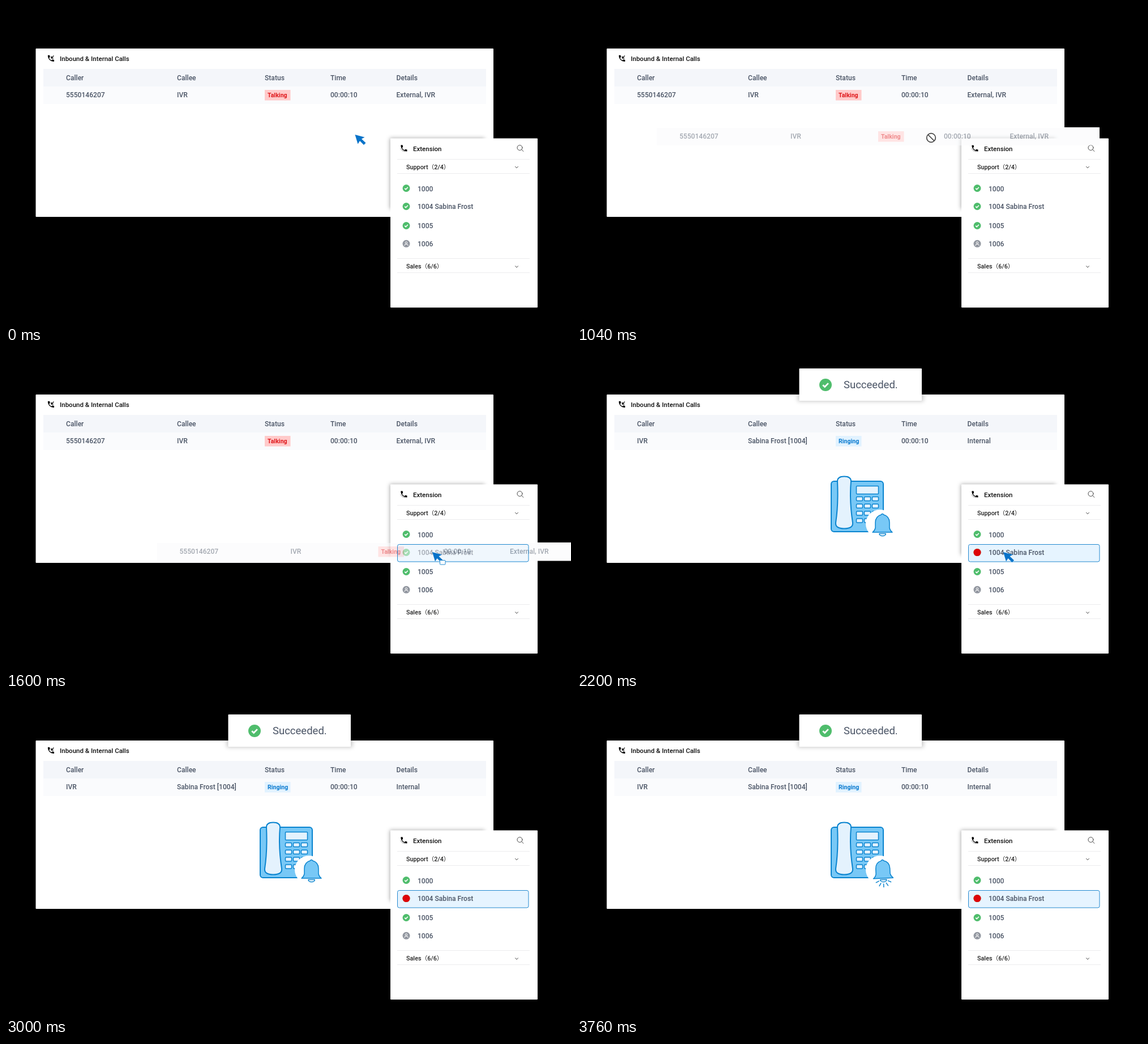
An HTML page that plays this animation: 998x561 px, repeating every 3800 ms.

```html
<!DOCTYPE html>
<html lang="en">
<head>
<meta charset="utf-8">
<title>Drag a call to an extension</title>
<style>
  html, body { margin: 0; width: 100%; height: 100%; overflow: hidden; background: #000; }
  svg { display: block; width: 100vw; height: 100vh; }
  text { font: 500 12.1px Roboto, "Noto Sans CJK SC", "Noto Sans CJK JP", sans-serif; fill: #4b5566; white-space: pre; }
  .title { font-size: 11.5px; fill: #111; }
  .group { font-size: 10.8px; fill: #222; }
  .chip { font-size: 10.6px; font-weight: 700; }
  .line { fill: none; stroke: #444; stroke-linecap: round; stroke-linejoin: round; }
  .rule { stroke: #ececee; }
  .art { stroke: #0a84cf; stroke-width: 2; stroke-linejoin: round; stroke-linecap: round; }
</style>
</head>
<body>
<svg viewBox="0 0 998 561">
  <defs>
    <filter id="soft" x="-20%" y="-20%" width="140%" height="140%"><feGaussianBlur stdDeviation="3.5"/></filter>
    <g id="check">
      <circle r="6.5" fill="#4fbd6c"/>
      <path d="M-2.8 .1L-.8 2.1L2.9-1.7" fill="none" stroke="#fff" stroke-width="1.6"/>
    </g>
    <path id="handset" transform="scale(.62)" d="M6.6 10.8c1.4 2.8 3.8 5.1 6.6 6.6l2.2-2.2c.3-.3.7-.4 1-.2 1.1.4 2.3.6 3.6.6.6 0 1 .4 1 1V20c0 .6-.4 1-1 1C10.600 21 3 13.400 3 4c0-.6.4-1 1-1h3.500c.6 0 1 .4 1 1 0 1.200.2 2.400.6 3.600.1.300 0 .7-.3 1z"/>
    <path id="chevron" class="line" d="M-2.500-1.200L0 1.200L2.500-1.200"/>
  </defs>

  <rect width="998" height="561"/>
  <rect id="under" x="66" y="141" width="782" height="32.500" fill="#fff"/>

  <!-- call list -->
  <rect x="52.500" y="75" width="808.500" height="297" rx="1" fill="#fff"/>
  <use href="#handset" x="72" y="85"/>
  <path class="line" style="stroke:#111" stroke-width="1.300" d="M84 88L80 92M80 89V92H83.200"/>
  <text class="title" x="95" y="96.500">Inbound &amp; Internal Calls</text>
  <rect x="66" y="111" width="782" height="31" fill="#f4f6fa"/>
  <rect x="66" y="142" width="782" height="31" fill="#fafbfd"/>
  <g id="head"></g>
  <g id="talking"></g>
  <g id="ringing"></g>

  <!-- desk phone -->
  <g id="phone" class="art">
    <rect x="449" y="228" width="92" height="89" rx="5" fill="#78c8f6"/>
    <path fill="#e4f2fd" d="M460 228Q460 219.500 472 219.500T484 228C482 250 483 275 487 301Q488 311.500 472 311.500T457 301C461 275 461 250 460 228Z"/>
    <g id="keys" fill="#e4f2fd" stroke-width="1.500"><rect x="493.500" y="236.500" width="39" height="14" rx="1"/></g>
    <circle cx="535" cy="303" r="25" fill="#fff" stroke="none"/>
    <g id="bell" stroke-width="1.500">
      <path d="M534 320.500a5.700 4 0 0 0 11.400 0Z" fill="#fff"/>
      <path d="M537.500 287a2.100 2.100 0 0 1 4 0C549 289 552 294 552 301V310Q553 315 557 318H522Q526 315 527 310V301C527 294 530 289 537.500 287Z" fill="#78c8f6"/>
      <path id="rays" fill="none"/>
    </g>
  </g>

  <!-- extension panel -->
  <rect x="678" y="233" width="167" height="125" fill-opacity=".32" filter="url(#soft)"/>
  <rect x="679" y="233.500" width="260" height="298.500" rx="1" fill="#fff"/>
  <use href="#handset" x="695.500" y="243.500"/>
  <path class="line" d="M697 251.500Q699 256.500 705 257" stroke-opacity=".5"/>
  <text class="title" x="719" y="256">Extension</text>
  <circle class="line" cx="907.500" cy="250" r="4.500"/>
  <path class="line" d="M910.800 253.300L914 256.500"/>
  <path class="rule" d="M691 270.500H925M691 295.500H925M691 445.500H925M691 470.500H925"/>
  <text class="group" x="707" y="288">Support（2/4）</text>
  <use href="#chevron" x="902" y="284.500"/>
  <text class="group" x="707" y="463">Sales（6/6）</text>
  <use href="#chevron" x="902" y="460"/>
  <rect id="hot" x="691.500" y="339.500" width="231.500" height="30.500" rx="3" fill="#e6f4ff"/>
  <use href="#check" x="707" y="321.500"/>
  <use href="#check" x="707" y="353.500"/>
  <use href="#check" x="707" y="387.500"/>
  <circle id="busy" cx="707" cy="353.500" r="6.600" fill="#de0508"/>
  <circle cx="707" cy="419.300" r="6.500" fill="#9297a0"/>
  <g fill="none" stroke="#fff"><circle cx="707" cy="417.600" r="1.800"/><path d="M703.700 423a3.300 3 0 0 1 6.600 0"/></g>
  <text x="727" y="327.200">1000</text>
  <text x="727" y="358.400">1004 Sabina Frost</text>
  <text x="727" y="392.300">1005</text>
  <text x="727" y="423.900">1006</text>

  <g id="ghost" opacity=".5"></g>
  <rect id="hotEdge" x="691.500" y="339.500" width="231.500" height="30.500" rx="3" fill="none" stroke="#2289cf"/>

  <!-- message -->
  <g id="toast">
    <rect x="390" y="36" width="222" height="51" fill-opacity=".22" filter="url(#soft)"/>
    <rect x="392.500" y="29" width="216.500" height="57" rx="1" fill="#fff"/>
    <use href="#check" transform="translate(439 58) scale(1.690)"/>
    <text x="471" y="64" style="font-size:18.500px;font-weight:400">Succeeded.</text>
  </g>

  <!-- pointer -->
  <g id="pointer">
    <g id="arrow">
      <path d="M0 0L17 4.500L11.500 7.500L19 14.500L15.500 18L8.500 11L5 16.500Z" fill="#0873c9"/>
      <rect id="carry" x="13.500" y="14.500" width="9.500" height="7.500" rx="1" fill="#fff" stroke="#2289cf"/>
    </g>
    <g id="noDrop" fill="#fff" stroke="#444" stroke-width="1.700">
      <circle cx="1.500" cy="3.500" r="7.800"/><path d="M-4 -2L7 9"/>
    </g>
  </g>
</svg>
<script>
const LOOP = 3800, STEP = 40, DROP = 1840, RING = 2200;
const el = id => document.getElementById(id);
const columns = [106, 302, 457, 573, 689.5];

const cells = (y, words) => words.map((word, i) =>
  word && `<text x="${columns[i]}" y="${y}">${word}</text>`).join("");

const callRow = (caller, callee, details, status, ink, fill) =>
  cells(160.8, [caller, callee, "", "00:00:10", details]) +
  `<rect x="457" y="148" width="45.500" height="18.500" fill="${fill}"/>
   <text class="chip" x="462" y="161" style="fill:${ink}">${status}</text>`;

const talking = callRow("5550146207", "IVR", "External, IVR", "Talking", "#e01b1f", "#ffcaca");
el("head").innerHTML = cells(130.6, ["Caller", "Callee", "Status", "Time", "Details"]);
el("talking").innerHTML = talking;
el("ghost").innerHTML = `<rect x="66" y="142" width="782" height="31" fill="#fafbfd"/>` + talking;
el("ringing").innerHTML = callRow("IVR", "Sabina Frost [1004]", "Internal", "Ringing", "#0b7bd0", "#e1f2ff");

for (let i = 0; i < 12; i++)
  el("keys").innerHTML += `<rect x="${493.5 + i % 3 * 14}" y="${255.5 + Math.floor(i / 3) * 12.8}" width="11" height="7" rx="1.500"/>`;

el("rays").setAttribute("d", [25, 58, 90, 122, 155].map(deg => {
  const a = deg * Math.PI / 180;
  const at = r => `${539.7 + r * Math.cos(a)} ${319 + r * Math.sin(a)}`;
  return `M${at(9)}L${at(14.5)}`;
}).join(""));

// time, row offset x and y, pointer x and y
const path = [
  [600, 0, 0, 616.5, 227],
  [840, 0, 0, 549, 156],
  [1040, 75, 73, 624, 229],
  [1160, 122, 116, 671, 272],
  [1280, 149.5, 143, 698, 299],
  [1440, 183, 177, 733, 333],
  [1600, 200.5, 195, 753, 353]
];

function pose(t) {
  const next = path.findIndex(k => k[0] > t);
  if (next === 0) return path[0];
  if (next < 0) return path[path.length - 1];
  const a = path[next - 1], b = path[next], u = (t - a[0]) / (b[0] - a[0]);
  return a.map((v, i) => v + (b[i] - v) * u);
}

const show = (id, on) => { el(id).style.display = on ? "" : "none"; };
const move = (id, x, y) => el(id).setAttribute("transform", `translate(${x} ${y})`);

function draw(t) {
  const [, dx, dy, px, py] = pose(t);
  const dragging = t > 840 && t < DROP, dropped = t >= DROP;
  const blocked = t > 840 && t < 1200;

  for (const id of ["under", "ghost"]) { show(id, dragging); move(id, dx, dy); }
  move("pointer", px, py);
  show("pointer", t < 2480);
  show("noDrop", blocked);
  show("arrow", !blocked);
  show("carry", dragging);

  for (const id of ["hot", "hotEdge"]) show(id, t >= 1480);
  show("talking", !dropped);
  show("ringing", dropped);
  show("busy", dropped);
  show("toast", dropped);
  el("toast").setAttribute("opacity", Math.min(1, Math.max(0, (t - DROP + STEP) / 120)));

  show("phone", t >= RING);
  const swing = (t - RING) / 800 % 1;
  el("bell").setAttribute("transform", `rotate(${8.5 * Math.sin(swing * 2 * Math.PI)} 539.5 286)`);
  show("rays", swing > .5);
}

const start = performance.now();
function tick() {
  const t = (performance.now() - start) % LOOP;
  draw(Math.floor(t / STEP) * STEP);
  requestAnimationFrame(tick);
}
tick();
</script>
</body>
</html>
```
